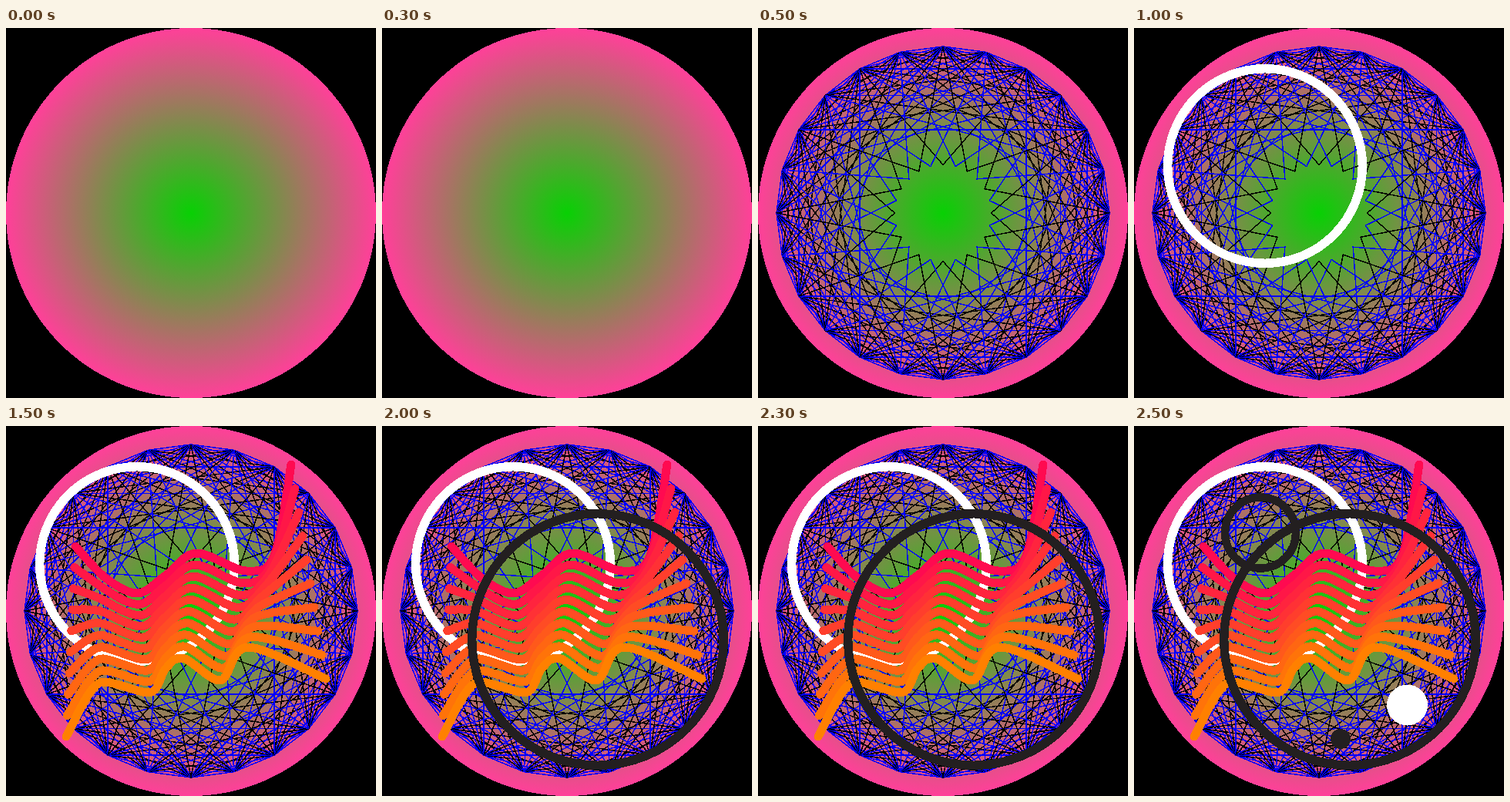
Recreate the animation shown at these times as an HTML page. Size 480 by 480 pixels, loop 3000 ms.

```html
<!DOCTYPE html>
<html lang="en">
<head>
<meta charset="utf-8">
<title>String circle</title>
<style>
  html, body { margin: 0; width: 100%; height: 100%; overflow: hidden; background: #000; }
  svg { display: block; width: 480px; height: 480px; }
</style>
</head>
<body>
<svg viewBox="0 0 480 480" fill="none" shape-rendering="crispEdges">
  <defs>
    <radialGradient id="glow" gradientUnits="userSpaceOnUse" cx="240" cy="240" r="240">
      <stop offset="0" stop-color="#08d004"/>
      <stop offset="1" stop-color="#ff4099"/>
    </radialGradient>
  </defs>
  <circle cx="240" cy="240" r="240" fill="url(#glow)"/>
  <g id="strings" stroke-width="1.5"></g>
  <g id="white"><circle cx="170" cy="179" r="126.3" stroke="#fff" stroke-width="11.5"/></g>
  <g id="waves" stroke-width="11" stroke-linecap="round"></g>
  <g id="ring"><circle cx="280" cy="277" r="163.3" stroke="#231f20" stroke-width="11.5"/></g>
  <g id="dots">
    <circle cx="164" cy="138.5" r="46" stroke="#231f20" stroke-width="10.5"/>
    <circle cx="354.5" cy="362" r="26.5" fill="#fff"/>
    <circle cx="268" cy="406" r="13" fill="#231f20"/>
  </g>
</svg>
<script>
const LOOP = 3000, STEP = 500;
const COUNT = 24, OUTER = 216, INNER = 62.5;
const $ = id => document.getElementById(id);
const mix = (a, b, t) => a + (b - a) * t;

function addPath(parent, d, stroke) {
  const path = document.createElementNS('http://www.w3.org/2000/svg', 'path');
  path.setAttribute('d', d);
  path.setAttribute('stroke', stroke);
  parent.append(path);
}

function polar(i, r) {
  const a = i * 2 * Math.PI / COUNT;
  return (240 + r * Math.sin(a)).toFixed(2) + ' ' + (240 - r * Math.cos(a)).toFixed(2);
}

// Chords of each span, then the inward points of the star.
function drawStrings() {
  const g = $('strings');
  for (let span = 1; span <= 8; span++) {
    let d = '';
    for (let i = 0; i < COUNT; i++) d += `M${polar(i, OUTER)}L${polar(i + span, OUTER)}`;
    addPath(g, d, span === 1 || span % 2 === 0 ? '#00f' : '#000');
  }
  for (let i = 0; i < COUNT; i++) {
    addPath(g, `M${polar(i - 2, OUTER)}L${polar(i, INNER)}L${polar(i + 2, OUTER)}`, i % 2 ? '#00f' : '#000');
  }
}

// Bezier coordinates through the points, level at every crest and dip.
function smooth(points) {
  return points.flatMap(([x, y], i) => {
    const [px, py] = points[i - 1] || points[i];
    const [nx, ny] = points[i + 1] || points[i];
    const dx = (nx - px) / 6;
    const dy = (y - py) * (ny - y) < 0 ? 0 : (ny - py) / 6;
    return [x - dx, y - dy, x, y, x + dx, y + dy];
  }).slice(2, -2);
}

// Ten curves blended from the red one to the orange one.
function drawWaves() {
  const red = smooth([[90, 156], [129, 197], [170, 217], [207, 194], [248, 165], [312, 188], [348, 168], [370, 50]]);
  const orange = smooth([[78, 403], [126, 332], [185, 346], [207, 315], [228, 301], [277, 330], [314, 287], [415, 328]]);
  for (let i = 0; i < 10; i++) {
    const t = i / 9;
    const p = red.map((v, k) => mix(v, orange[k], t).toFixed(1));
    addPath($('waves'), `M${p.slice(0, 2)}C${p.slice(2)}`, `rgb(255 ${mix(10, 128, t)} ${mix(80, 0, t)})`);
  }
}

drawStrings();
drawWaves();

// One more layer appears at each step.
['strings', 'white', 'waves', 'ring', 'dots'].forEach((id, i) => {
  $(id).animate([
    { opacity: 0, offset: 0, easing: 'step-end' },
    { opacity: 1, offset: (i + 1) * STEP / LOOP, easing: 'step-end' },
    { opacity: 1, offset: 1 }
  ], { duration: LOOP, iterations: Infinity });
});
</script>
</body>
</html>
```
